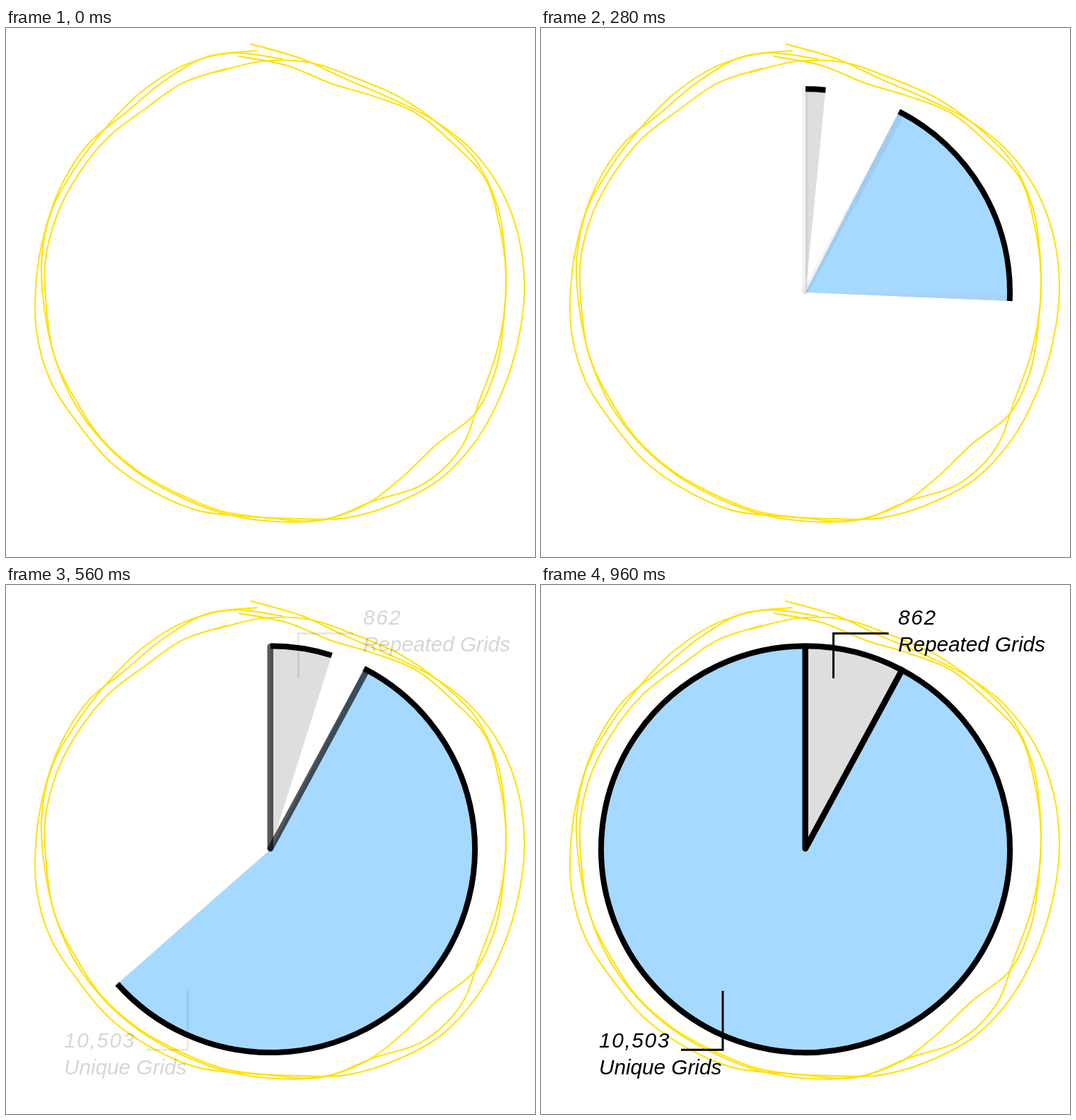
An HTML page for the animation above (1000 ms loop, 748x748 px).

```html
<!DOCTYPE html>
<html lang="en">
<head>
<meta charset="utf-8">
<title>Grid pie chart</title>
<style>
  html, body { margin: 0; width: 100%; height: 100%; overflow: hidden; background: #fff; }
  svg { display: block; width: 100%; height: 100%; }
  text { font: italic 29.7px "Liberation Sans", Arial, sans-serif; }
  .num { letter-spacing: 1.7px; }
  .rim { fill: none; stroke: #000; stroke-width: 8; }
  .spoke { stroke: #000; stroke-width: 8.5; stroke-linecap: round; }
  .leader { fill: none; stroke: #000; stroke-width: 3; }
</style>
</head>
<body>
<svg viewBox="0 0 748 748">
  <g id="scribble" fill="none" stroke="#ffe10a" stroke-width="2.1" stroke-linecap="round"></g>
  <path id="blue" fill="#a6d9ff"/>
  <path id="sheen" fill="#a9d1f4"/>
  <path id="blueRim" class="rim"/>
  <path id="gray" fill="#dedede"/>
  <path id="grayRim" class="rim"/>
  <line id="spokeA" class="spoke" x1="373.7" y1="372.5" x2="373.7" y2="87"/>
  <line id="spokeB" class="spoke" x1="374" y1="372.5" x2="509.5" y2="122"/>
  <g id="leaders">
    <path class="leader" d="M413.5 132V68.5H491.5"/>
    <path class="leader" d="M257 574V657.3H198"/>
  </g>
  <g id="labels">
    <text class="num" x="505" y="56">862</text>
    <text x="505" y="94">Repeated Grids</text>
    <text class="num" x="82" y="654">10,503</text>
    <text x="82" y="692">Unique Grids</text>
  </g>
</svg>
<script>
const $ = id => document.getElementById(id);
const LOOP = 1000, STEP = 40;
const CX = 374, CY = 373.7, RX = 289, RY = 287.4;
const BLUE_START = 27.2, GRAY_END = 28.8;

// Point on an ellipse, degrees clockwise from the top
function polar(cx, cy, rx, ry, deg) {
  const a = deg * Math.PI / 180;
  return [cx + rx * Math.sin(a), cy - ry * Math.cos(a)];
}

// Catmull-Rom spline through points
function spline(pts) {
  const at = i => pts[Math.max(0, Math.min(pts.length - 1, i))];
  let d = "M" + pts[0];
  for (let i = 0; i < pts.length - 1; i++) {
    const [a, b, c, e] = [at(i - 1), at(i), at(i + 1), at(i + 2)];
    const c1 = b.map((v, k) => v + (c[k] - a[k]) / 6);
    const c2 = c.map((v, k) => v - (e[k] - b[k]) / 6);
    d += `C${c1} ${c2} ${c}`;
  }
  return d;
}

// One pen turn: radii at evenly spaced angles
function penLoop(from, to, radii) {
  const step = (to - from) / (radii.length - 1);
  const pts = radii.map((r, i) => polar(380, 368, r, r, from + i * step));
  const path = document.createElementNS("http://www.w3.org/2000/svg", "path");
  path.setAttribute("d", spline(pts));
  $("scribble").append(path);
}

penLoop(-5.6, 355.7, [
  347, 327, 312.5, 314, 326, 340, 349, 352.5, 353, 352, 353.5, 357, 357, 348.5, 340, 327,
  325, 332.5, 335, 338, 337.5, 343, 342.5, 337.5, 335, 335, 333.5, 325.5, 332, 341, 337]);
penLoop(-15.4, 362.1, [
  316.5, 321.5, 323, 318.5, 323, 328.5, 337, 335.5, 329, 326.5, 326.5, 330, 347, 347.5, 331.5, 335,
  330, 327, 324, 324.5, 325.5, 326.5, 326, 327, 332, 334, 329.5, 329.5, 335.5, 340.5, 338, 324]);
penLoop(-8.8, 347.7, [
  332, 315.5, 300.5, 305, 318, 324.5, 335.5, 330, 327.5, 327, 333, 334, 318, 322, 332, 334,
  325, 324, 321, 323, 324.5, 323, 326, 324, 326.5, 325, 321, 318, 313, 318, 318]);

// Share of the sweep that is complete at each key time
const keys = [[0, 0], [200, .1115], [360, .298], [560, .605], [680, .772], [800, .926], [960, 1]];

function slope(i) {
  if (i === 0 || i === keys.length - 1) return 0;
  const [[t0, v0], [t1, v1], [t2, v2]] = keys.slice(i - 1, i + 2);
  const before = (v1 - v0) / (t1 - t0), after = (v2 - v1) / (t2 - t1);
  return (before * (t2 - t1) + after * (t1 - t0)) / (t2 - t0);
}

function progress(t) {
  const i = keys.findIndex(k => k[0] > t) - 1;
  if (i < 0) return 1;
  const [[t0, v0], [t1, v1]] = [keys[i], keys[i + 1]];
  const h = t1 - t0, u = (t - t0) / h, u2 = u * u, u3 = u2 * u;
  return v0 + (v1 - v0) * (3 * u2 - 2 * u3)
    + h * (slope(i) * (u3 - 2 * u2 + u) + slope(i + 1) * (u3 - u2));
}

function fade(t, from, to) {
  const u = Math.max(0, Math.min(1, (t - from) / (to - from)));
  return u * u * (3 - 2 * u);
}

function arc(from, to) {
  const [a, b] = [from, to].map(deg => polar(CX, CY, RX, RY, deg));
  return `${a}A${RX} ${RY} 0 ${to - from > 180 ? 1 : 0} 1 ${b}`;
}

const wedge = (from, to) => to - from > .01 ? `M${CX} ${CY}L${arc(from, to)}Z` : "";

function slice(name, from, to) {
  $(name).setAttribute("d", wedge(from, to));
  $(name + "Rim").setAttribute("d", to - from > .01 ? "M" + arc(from, to) : "");
}

function draw(t) {
  const p = progress(t);
  const end = BLUE_START + (360 - BLUE_START) * p;
  slice("blue", BLUE_START, end);
  slice("gray", 0, GRAY_END * p);

  $("sheen").setAttribute("d", wedge(Math.max(BLUE_START, end - 2), end));
  $("sheen").setAttribute("opacity", .8 * (1 - fade(t, 280, 520)));

  const spoke = fade(t, 200, 800), label = fade(t, 480, 800);
  $("spokeA").setAttribute("opacity", spoke);
  $("spokeB").setAttribute("opacity", spoke);
  $("labels").setAttribute("opacity", label);
  $("leaders").setAttribute("opacity", label ** 1.3);
}

const start = performance.now();
function tick() {
  const t = (performance.now() - start) % LOOP;
  draw(Math.floor(t / STEP) * STEP);
  requestAnimationFrame(tick);
}
tick();
</script>
</body>
</html>
```
